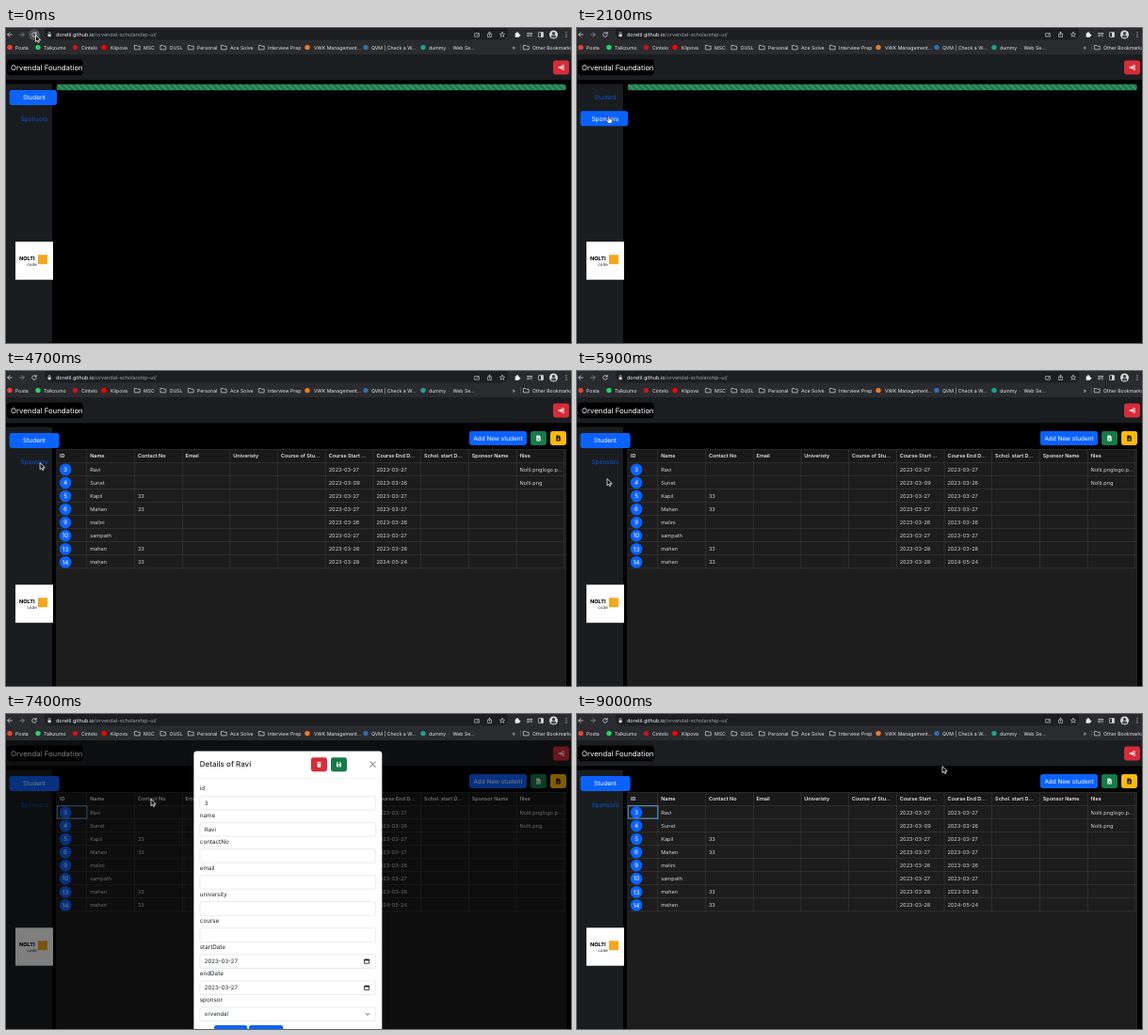
Animation, 600 px wide and 335 px high, one loop 9100 ms. Source, as an HTML page with a canvas:

```html
<!DOCTYPE html>
<html lang="en">
<head>
<meta charset="utf-8">
<title>Scholarship admin</title>
<style>
html, body { margin: 0; width: 100%; height: 100%; overflow: hidden; background: #000; }
canvas { display: block; width: 600px; height: 335px; }
</style>
</head>
<body>
<canvas id="stage"></canvas>
<script>
const LOOP = 9100, STEP = 100;
const BLUE = '#0a62ff', GREEN = '#167a49', RED = '#d72c39', YELLOW = '#ffba08';
const ratio = window.devicePixelRatio || 1;

function prepare(canvas) {
  canvas.width = 600 * ratio;
  canvas.height = 335 * ratio;
  const context = canvas.getContext('2d');
  context.scale(ratio, ratio);
  context.textRendering = 'geometricPrecision';
  return context;
}
const stage = prepare(document.getElementById('stage'));
const layer = prepare(document.createElement('canvas'));
let ctx = stage;

const clamp = v => Math.max(0, Math.min(1, v));
const easeOut = v => 1 - (1 - v) ** 2;

function rect(x, y, w, h, color) {
  ctx.fillStyle = color;
  ctx.fillRect(x, y, w, h);
}
function box(x, y, w, h, r, fill, border, lineWidth = 0.6) {
  ctx.beginPath();
  ctx.roundRect(x, y, w, h, r);
  if (fill) { ctx.fillStyle = fill; ctx.fill(); }
  if (border) { ctx.strokeStyle = border; ctx.lineWidth = lineWidth; ctx.stroke(); }
}
function circle(x, y, r, color) {
  ctx.beginPath();
  ctx.arc(x, y, r, 0, 7);
  ctx.fillStyle = color;
  ctx.fill();
}
// y is the middle of the capital letters
function text(str, x, y, size, color, weight = 400, align = 'left') {
  ctx.font = `${weight} ${size}px Inter, "Open Sans", sans-serif`;
  ctx.textAlign = align;
  ctx.fillStyle = color;
  ctx.fillText(str, x, y + size * 0.36);
}
// Icon paths are drawn around their own centre
function icon(d, x, y, { fill, stroke, width = 0.8 }) {
  const path = new Path2D(d);
  ctx.save();
  ctx.translate(x, y);
  if (fill) { ctx.fillStyle = fill; ctx.fill(path); }
  if (stroke) {
    ctx.strokeStyle = stroke;
    ctx.lineWidth = width;
    ctx.lineJoin = ctx.lineCap = 'round';
    ctx.stroke(path);
  }
  ctx.restore();
}

const ICONS = {
  back: 'M2.3 0H-2.3M0 -2.3L-2.3 0L0 2.3',
  forward: 'M-2.3 0H2.3M0 -2.3L2.3 0L0 2.3',
  reload: 'M2 -1.2A2.3 2.3 0 1 0 2.3 .5M2.2 -2.5V-1H.6',
  folder: 'M-2.7 -2.2H-.6L.1 -1.4H2.7V2.2H-2.7Z',
  star: 'M0 -2.6L.8 -.8L2.7 -.7L1.2 .5L1.7 2.4L0 1.3L-1.7 2.4L-1.2 .5L-2.7 -.7L-.8 -.8Z',
  share: 'M-1 -.8H-2V2.6H2V-.8H1M0 1V-2.7M-1.2 -1.6L0 -2.7L1.2 -1.6',
  puzzle: 'M-2.3 -1.5H-.9A.9 .9 0 1 1 .7 -1.5H2V0A.9 .9 0 1 1 2 1.5V2.7H-2.3Z',
  screen: 'M2.4 0V1.8H-2.4V-1.8H.4M0 .5L2 -1.6M1 -1.8H2.2V-.6',
  playlist: 'M-2.5 -2H1M-2.5 -.4H1M-2.5 1.2H-.3M2 -2V1.6M2 -2H2.7',
  file: 'M-2.2 -3H.6L2.2 -1.4V3H-2.2Z',
  sheet: 'M-1 -.3L1 2M1 -.3L-1 2',
  download: 'M0 -.8V2M-1 1L0 2L1 1',
  exit: 'M-2.8 -.8H-.3V-2.2L2 0L-.3 2.2V.8H-2.8ZM1.2 -2.7H3V2.7H1.2V1.8H2.1V-1.8H1.2Z',
  trash: 'M-2.3 -2.4H-.8L-.5 -3H.5L.8 -2.4H2.3V-1.6H-2.3ZM-1.9 -1.2H1.9L1.6 3H-1.6Z',
  save: 'M-2.5 -2.5H1.5L2.5 -1.5V2.5H-2.5Z',
  close: 'M-2.7 -2.7L2.7 2.7M2.7 -2.7L-2.7 2.7',
  chevron: 'M-1.9 -.9L0 1L1.9 -.9',
  calendar: 'M-2.3 -1.8H2.3V2.3H-2.3Z',
  arrow: 'M0 0V6.6L1.6 5.2L2.7 7.5L3.9 7L2.8 4.8H4.9Z',
  hand: 'M0 0Q1 -.6 1.3 .5V2.6L4 3.3Q4.7 3.6 4.4 4.7L3.8 7.3H.2L-1.8 4.4Q-1.6 3.3 -.5 4L0 4.4Z'
};

function browser(reloadHover) {
  const light = '#d5d7da';
  rect(0, 0, 600, 28, '#2a2b2e');
  box(41, -4, 492, 16.5, 7, '#1d1e21');
  if (reloadHover) circle(30, 7, 6, '#505155');
  icon(ICONS.back, 4, 7, { stroke: light });
  icon(ICONS.forward, 17, 7, { stroke: '#8b8d91' });
  icon(ICONS.reload, 30, 7, { stroke: light });
  box(44.5, 6.4, 3.2, 2.8, 0.3, light);
  icon('M-1 0V-1A1 1 0 0 1 1 -1V0', 46.1, 6.4, { stroke: light, width: 0.6 });
  const host = 'doretil.github.io';
  text(host, 53, 7.3, 5.5, '#f1f3f4');
  text('/orvendal-scholarship-ui/', 53 + ctx.measureText(host).width, 7.3, 5.5, '#9aa0a6');

  icon(ICONS.screen, 500, 7.4, { stroke: light, width: 0.6 });
  icon(ICONS.share, 513.5, 7, { stroke: light, width: 0.6 });
  icon(ICONS.star, 527, 7, { stroke: light, width: 0.6 });
  icon(ICONS.puzzle, 543, 7, { fill: '#f1f3f4' });
  icon(ICONS.playlist, 556, 7.5, { stroke: light, width: 0.7 });
  box(565.5, 4.6, 5, 5, 0.5, null, light, 0.7);
  rect(568, 4.6, 2.5, 5, light);
  circle(581.5, 7, 4.5, '#d8d9da');
  circle(581.5, 5.7, 1.6, '#4a3b35');
  box(578.8, 7.5, 5.4, 3.1, 1.5, '#4b4e55');
  for (const y of [4.8, 7, 9.2]) circle(595, y, 0.6, light);

  const marks = [
    ['Posta', 10, '#ea4335', 4], ['Talkzumo', 40, '#25d366', 34], ['Cintelo', 80, '#c8141d', 73.5],
    ['Klipova', 111, '#f00', 104], ['MSC', 146], ['OUSL', 173.5], ['Personal', 203],
    ['Ace Solve', 238], ['Interview Prep', 278], ['VWK Management...', 327, '#f07c1f', 320],
    ['QVM | Check a W...', 388, '#2d6fb0', 382], ['dummy  ·  Web Se...', 449, '#19a58b', 443],
    ['Other Bookmarks', 559]
  ];
  for (const [label, x, color, iconX] of marks) {
    text(label, x, 20.8, 5.2, '#e8eaed');
    if (color) circle(iconX, 20.6, 2.7, color);
    else icon(ICONS.folder, x - 6.5, 20.7, { stroke: light, width: 0.7 });
  }
  text('»', 537.5, 20.4, 6, light);
  rect(546, 17, 0.5, 7, '#606267');
}

function iconButton(x, y, color, name, ink, mark) {
  box(x, y, 17, 15, 2.4, color);
  icon(ICONS[name], x + 8.5, y + 7.5, { fill: ink });
  if (mark) icon(ICONS[mark], x + 8.5, y + 7.5, { stroke: color, width: 0.7 });
}

function shell(tab, loading) {
  rect(0, 28, 600, 307, '#000');
  rect(0, 28, 600, 27.3, '#1b1e21');
  box(1, 33.5, 80.8, 16.8, 4, '#000');
  text('Orvendal Foundation', 5, 42.2, 7.8, '#fff');
  iconButton(581, 34.5, RED, 'exit', '#fff');
  rect(0, 59.5, 49, 276, '#1a1d20');
  ['Student', 'Sponsors'].forEach((label, i) => {
    const y = 74 + i * 22.3;
    if (tab === i) box(3.6, y - 8, loading ? 50.4 : 53, 16, 2.4, BLUE);
    text(label, 30, y, 6.5, tab === i ? '#fff' : '#0a55d6', 400, 'center');
  });
  rect(10, 227.3, 40, 40.4, '#fff');
  text('NOLTI', 14, 244.5, 5.6, '#111', 800);
  text('code', 22.3, 251.3, 4.4, '#222');
  rect(34, 241.2, 10, 10, '#f5a81c');
}

function progress(t) {
  ctx.save();
  ctx.beginPath();
  ctx.roundRect(53.8, 59.8, 541, 6.5, 2.4);
  ctx.clip();
  rect(53, 59, 543, 8, GREEN);
  const size = 6.43, shift = -(t % 1000) / 1000 * size;
  ctx.fillStyle = 'rgba(255,255,255,.16)';
  for (let x = 47 + shift; x < 610; x += size) {
    ctx.beginPath();
    ctx.moveTo(x, 59.8);
    ctx.lineTo(x + size / 2, 59.8);
    ctx.lineTo(x + size * 1.5, 66.3);
    ctx.lineTo(x + size, 66.3);
    ctx.fill();
  }
  ctx.restore();
}

const ROW = 14.07, TOP = 83.4, LEFT = 53.8;
const columnX = i => i ? 86 + (i - 1) * 50.7 : LEFT;
const STUDENT_HEADS = ['ID', 'Name', 'Contact No', 'Email', 'Univeristy', 'Course of Stu...',
  'Course Start ...', 'Course End D...', 'Schol. start D...', 'Sponsor Name', 'files'];
const student = (id, name, contact, start, end, files) =>
  [id, name, contact, '', '', '', '2023-03-' + start, end, '', '', files];
const STUDENTS = [
  student(3, 'Ravi', '', '27', '2023-03-27', 'Nolti.pnglogo.p...'),
  student(4, 'Sunet', '', '09', '2023-03-26', 'Nolti.png'),
  student(5, 'Kapil', '33', '27', '2023-03-27'),
  student(6, 'Mahen', '33', '27', '2023-03-27'),
  student(9, 'malini', '', '26', '2023-03-26'),
  student(10, 'sampath', '', '27', '2023-03-27'),
  student(13, 'mahen', '33', '28', '2023-03-28'),
  student(14, 'mahen', '33', '28', '2024-05-24')
];

function grid(heads, rows, focused) {
  const right = 594.6, line = '#444';
  rect(LEFT, TOP, right - LEFT, 252, '#1d1d1d');
  rect(LEFT, TOP, right - LEFT, ROW, '#191919');
  const bottom = TOP + ROW * (rows.length + 1);
  for (let y = TOP + ROW; y <= bottom + 0.1; y += ROW) rect(LEFT, y - 0.4, right - LEFT, 0.45, line);
  heads.forEach((head, i) => {
    const x = columnX(i);
    rect(columnX(i + 1) - 0.4, TOP, 0.45, bottom - TOP, line);
    text(head, x + 3.2, TOP + 7, 5.45, '#e6e6e6', 600);
    rows.forEach((row, r) => {
      const y = TOP + ROW * (r + 1.5);
      if (i === 0) {
        circle(63.1, y + 0.3, 6.3, BLUE);
        text(row[0], 63.1, y + 0.3, 6.5, '#fff', 400, 'center');
      } else if (row[i]) text(row[i], x + 3.2, y, 5.6, '#d4d4d4');
    });
  });
  ctx.strokeStyle = '#3a3a3a';
  ctx.lineWidth = 0.5;
  ctx.strokeRect(LEFT, TOP, right - LEFT, 260);
  if (focused) {
    ctx.strokeStyle = '#66afe9';
    ctx.lineWidth = 0.9;
    ctx.strokeRect(LEFT + 0.5, TOP + ROW + 0.3, 31.6, ROW - 0.8);
  }
}

function toolbar() {
  box(492, 64, 61, 15, 2.4, BLUE);
  text('Add New student', 522.5, 71.6, 6.4, '#fff', 400, 'center');
  iconButton(557, 64, GREEN, 'file', '#fff', 'sheet');
  iconButton(578, 64, YELLOW, 'file', '#111', 'download');
}

const FIELDS = [['id', '3'], ['name', 'Ravi'], ['contactNo'], ['email'], ['university'], ['course'],
  ['startDate', '2023-03-27'], ['endDate', '2023-03-27'], ['sponsor', 'orvendal']];

function modal() {
  const ink = '#212529';
  box(199.4, 39.5, 199.9, 340, 3.2, '#fff');
  text('Details of Ravi', 205.8, 53.6, 8, ink, 500);
  iconButton(324, 46.2, RED, 'trash', '#fff');
  iconButton(345, 46.2, GREEN, 'save', '#fff');
  rect(351.8, 51.6, 3, 1.5, GREEN);
  circle(353.5, 54.8, 0.9, GREEN);
  icon(ICONS.close, 389.5, 53.6, { stroke: '#555', width: 0.9 });
  rect(199.4, 68.2, 199.9, 0.45, '#dee2e6');
  FIELDS.forEach(([label, value], i) => {
    const y = 79.2 + i * 28.07;
    text(label, 205.8, y, 6.3, ink);
    box(205.9, y + 8.2, 186.8, 14.6, 2.4, '#fff', '#ced4da', 0.5);
    if (value) text(value, 210.8, y + 15.5, 6.1, ink);
    if (label.endsWith('Date')) {
      icon(ICONS.calendar, 383.3, y + 15.3, { stroke: '#111', width: 0.8 });
      rect(381, y + 13.2, 4.6, 1.5, '#111');
    }
    if (label === 'sponsor') icon(ICONS.chevron, 384, y + 15.5, { stroke: '#343a40' });
  });
  text('files:', 205.8, 338.8, 6.3, ink);
  box(221, 331, 35.3, 15.6, 2.4, BLUE);
  text('Nolti.png', 238.6, 338.8, 6.3, '#fff', 400, 'center');
  box(258, 331, 36.3, 15.6, 2.4, BLUE);
  text('logo.png', 276.1, 338.8, 6.3, '#fff', 400, 'center');
}

// Fades the modal as one group, so its parts do not show through each other
function fadeModal(alpha, shift) {
  ctx = layer;
  ctx.clearRect(0, 0, 600, 335);
  ctx.save();
  ctx.translate(0, shift);
  modal();
  ctx.restore();
  ctx = stage;
  ctx.globalAlpha = alpha;
  ctx.drawImage(layer.canvas, 0, 0, 600, 335);
  ctx.globalAlpha = 1;
}

// time, x, y of the pointer tip
const POINTER = [
  [0, 31.5, 8], [200, 36, 17], [700, 85, 91], [1200, 83, 93], [2000, 33, 94], [2400, 33, 94],
  [2900, 34, 74], [3400, 34, 74], [4300, 37, 92], [5400, 34, 112], [5900, 32, 115],
  [6200, 34, 114], [6600, 65, 108], [6900, 65, 108], [7400, 154, 91], [8300, 388, 52],
  [8700, 388, 52], [9000, 388, 56], [LOOP, 388, 56]
];
function pointer(t) {
  const next = POINTER.findIndex(p => p[0] > t);
  const [t0, x0, y0] = POINTER[next - 1], [t1, x1, y1] = POINTER[next];
  const k = (t - t0) / (t1 - t0), e = k * k * (3 - 2 * k);
  const x = x0 + (x1 - x0) * e, y = y0 + (y1 - y0) * e;
  const hand = (t >= 1900 && t < 3700) || (t >= 6500 && t < 7000) || (t >= 8300 && t < 8800);
  icon(hand ? ICONS.hand : ICONS.arrow, x, y,
    hand ? { fill: '#fff', stroke: '#222', width: 0.6 } : { fill: '#000', stroke: '#fff', width: 0.8 });
}

const OPEN = 6785, CLOSE = 8600;

function draw(t) {
  const tab = t >= 2100 && t < 2900 ? 1 : 0;
  const loading = t < 500 || (t >= 2100 && t < 2300) || (t >= 2900 && t < 3200);
  shell(tab, loading);
  if (loading) progress(t);
  else if (tab === 1) grid(['ID', 'Name'], [], false);
  else {
    toolbar();
    grid(STUDENT_HEADS, STUDENTS, t >= 6700);
  }

  const opening = t < CLOSE;
  const span = opening ? t - OPEN : t - CLOSE;
  const fade = opening ? clamp(span / 150) : 1 - clamp(span / 150);
  const slide = easeOut(clamp(span / 300));
  const dim = opening ? clamp(span / 100) : 1 - clamp((span - 200) / 150);
  if (dim > 0) rect(0, 28, 600, 307, `rgba(0,0,0,${dim / 2})`);
  if (fade > 0) fadeModal(fade, -20.1 * (opening ? 1 - slide : slide));

  browser(t < 200);
  pointer(t);
}

const start = performance.now();
function tick() {
  const elapsed = (performance.now() - start) % LOOP;
  draw(Math.floor(elapsed / STEP) * STEP);
  requestAnimationFrame(tick);
}
tick();
</script>
</body>
</html>
```
